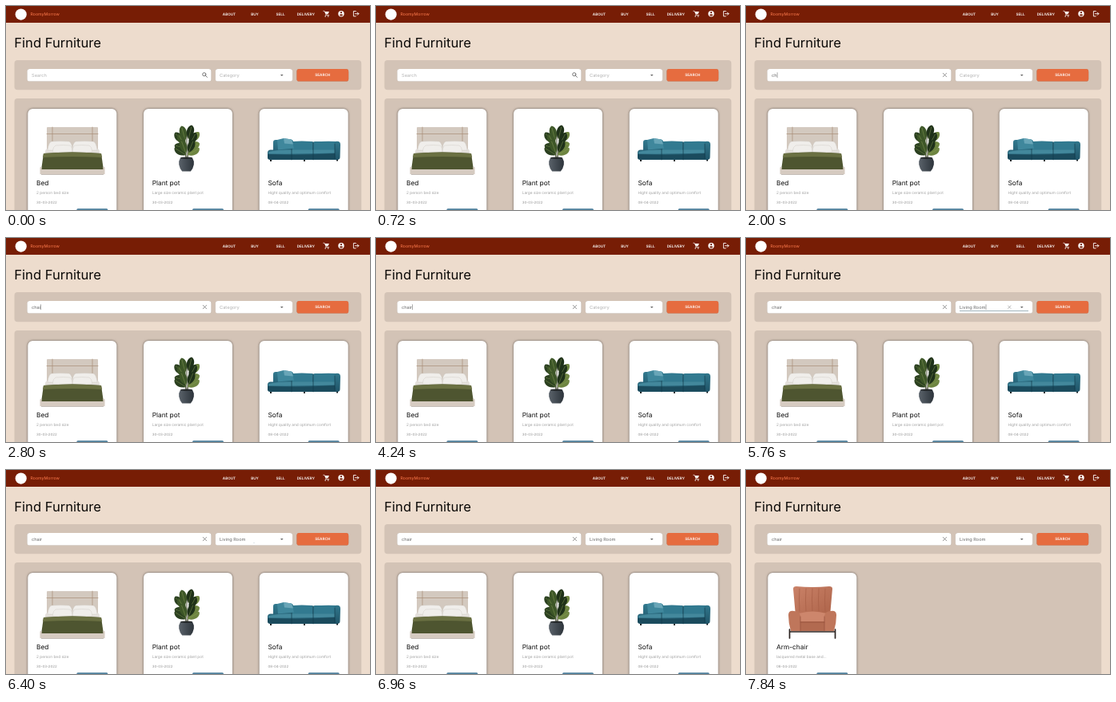
Animation, 455 px wide and 256 px high, one loop 8000 ms. Source, as an HTML page:

```html
<!DOCTYPE html>
<html lang="en">
<head>
<meta charset="utf-8">
<title>Find Furniture</title>
<style>
  html, body { margin: 0; width: 100%; height: 100%; overflow: hidden; background: #eddccd; }
  svg { display: block; width: 455px; height: 256px; font-family: Inter, sans-serif; text-rendering: geometricPrecision; }
  .nav { font-size: 4.6px; font-weight: 600; fill: #fff; }
  .input { font-size: 5.6px; fill: #686868; }
  .hint { font-size: 5.7px; fill: #b4b4b4; }
  .name { font-size: 8.3px; fill: #111; }
  .note { font-size: 4.8px; fill: #a0a0a0; }
  .date { font-size: 4.4px; fill: #909090; }
  .line { fill: none; stroke-linecap: round; stroke-linejoin: round; }
  .card { filter: drop-shadow(0 .8px 1.8px #0008); }
</style>
</head>
<body>
<svg viewBox="0 0 455 256">
  <defs>
    <linearGradient id="teal" x2="0" y2="1">
      <stop stop-color="#32798e"/><stop offset="1" stop-color="#1f5468"/>
    </linearGradient>
    <linearGradient id="clay" x2="1" y2="1">
      <stop stop-color="#ca8268"/><stop offset="1" stop-color="#ad6349"/>
    </linearGradient>
    <linearGradient id="pot" x2="1" y2="0">
      <stop stop-color="#5a626a"/><stop offset="1" stop-color="#2d343b"/>
    </linearGradient>
  </defs>
  <rect width="455" height="256" fill="#eddccd"/>

  <rect width="455" height="21" fill="#771d05"/>
  <circle cx="18.7" cy="10.6" r="7.1" fill="#fff"/>
  <text x="30.5" y="12.4" font-size="5.2" font-weight="500" fill="#ee7045">RoomyMorrow</text>
  <g class="nav" text-anchor="middle">
    <text x="279" y="12.4">ABOUT</text>
    <text x="311" y="12.4">BUY</text>
    <text x="343" y="12.4">SELL</text>
    <text x="374.9" y="12.4">DELIVERY</text>
  </g>
  <g fill="#fff">
    <path d="M396.8 6.3h1.3l2 4.1-.7 1.2h4.300" class="line" stroke="#fff" stroke-width=".7"/>
    <path d="M398.3 6.900h5.600l-1.500 3.300h-2.700z"/>
    <circle cx="399.2" cy="12.900" r=".75"/><circle cx="402.700" cy="12.900" r=".75"/>
    <circle cx="419" cy="9.7" r="3.7"/>
    <g fill="#771d05"><circle cx="419" cy="8.2" r="1.1"/><path d="M416.7 11.2q2.3-2 4.6 0q-2.3 2.5-4.6 0"/></g>
    <path d="M437.2 6.5h-2.8v6.4h2.8M436.5 9.7h4.3m-1.6-1.7 1.7 1.7-1.7 1.7" class="line" stroke="#fff" stroke-width=".9"/>
  </g>

  <text x="10.3" y="52.3" font-size="16.6" fill="#0b0907">Find Furniture</text>

  <g fill="#d3c3b6">
    <rect x="10.5" y="68" width="433.7" height="37.3" rx="4"/>
    <rect x="10.5" y="116" width="433.7" height="150" rx="4"/>
  </g>
  <g fill="#fff" style="filter:drop-shadow(0 .5px .7px #0004)">
    <rect x="26.5" y="79" width="230" height="15.6" rx="3.2"/>
    <rect x="261.8" y="79" width="96.3" height="15.6" rx="3.2"/>
    <rect x="363.4" y="79" width="64.8" height="15.6" rx="3.2" fill="#e66c3f"/>
  </g>
  <text class="nav" x="395.8" y="88.4" text-anchor="middle">SEARCH</text>

  <text id="query" class="input" x="32" y="88.6"></text>
  <text id="room" class="input" x="267" y="88.6"></text>
  <rect id="caret" y="83.3" width=".5" height="6.8" fill="#555"/>
  <path id="lens" class="line" d="M249.5 87.4l2 2M249.9 85.800a2.1 2.1 0 1 1-4.2 0a2.1 2.1 0 1 1 4.2 0" stroke="#666" stroke-width=".9"/>
  <path id="wipe" class="line" d="M246.3 84.4l4.4 4.4m0-4.4-4.4 4.4" stroke="#666" stroke-width=".7"/>
  <path id="clear" class="line" d="M327.6 85l3.4 3.4m0-3.400-3.400 3.400" stroke="#888" stroke-width=".6"/>
  <path d="M343 86h3.600l-1.800 1.900z" fill="#666"/>
  <rect id="rule" y="91" height=".6" fill="#5f7f8d"/>

  <g id="all"></g>
  <g id="found"></g>
</svg>
<script>
const $ = id => document.getElementById(id);

const bed = `
  <path d="M51 153q0-1 1-1h62q1 0 1 1v34H51z" fill="#d3c9bf"/>
  <path d="M51 160.500h64M58 152v22M108 152v22" class="line" stroke="#a98f78" stroke-width=".7"/>
  <path d="M49 183q0-4 4-4h60q4 0 4 4v5H49z" fill="#e5e1dd"/>
  <g fill="#f0eeeb" stroke="#cbc5be" stroke-width=".4">
    <path d="M52 181q1-10 5-11 11-1 22 0 4 2 4 12zM83 182q0-10 4-12 11-1 22 0 4 1 5 11z"/>
    <path d="M58 183q1-7 4-8 10-1 18 0 3 2 3 9zM83 184q0-7 3-9 8-1 18 0 3 1 4 8z"/>
  </g>
  <path d="M47 185q36-3 72 0l3 21H44z" fill="#4e5530"/>
  <path d="M47 185q36-3 72 0l1 5q-37-2-74 0z" fill="#6a7042"/>
  <path d="M42.500 203q0-1 1-1h1v3h77v-3h1q1 0 1 1v8h-81z" fill="#d6cbc1"/>
  <path d="M44 211.500h78" stroke="#9c9188" stroke-width=".6"/>`;

// base x, base y, tilt, length
const leaves = [
  [222, 172, -40, 17], [230, 171, 42, 17], [224, 169, -14, 19], [228, 167, 14, 18],
  [224, 179, -72, 14], [228, 178, 68, 15], [224, 176, -30, 17], [229, 175, 28, 18],
  [225, 187, -58, 17], [227, 187, 60, 17], [225, 185, -20, 18], [228, 184, 22, 17]
];
const greens = ['#2b4020', '#6d8440', '#3d5628', '#1f3119'];
const leaf = ([x, y, tilt, len], i) => `
  <g transform="translate(${x} ${y}) rotate(${tilt})">
    <path d="M0 0C-7 ${-len * .4} -5 ${-len * .9} 0 ${-len}C5 ${-len * .9} 7 ${-len * .4} 0 0" fill="${greens[i % 4]}"/>
    <path d="M0 0V${-len * .9}" stroke="#8fa45c" stroke-width=".4"/>
  </g>`;
const plant = `
  <path d="M226 191V162M227 191l2-18M225 191l-2-16" class="line" stroke="#3c4025" stroke-width=".9"/>
  ${leaves.map(leaf).join('')}
  <path d="M218 190.500h15q2.500 4 1.800 8.500-1 5.500-4 8.500h-10.600q-3-3-4-8.500-.700-4.500 1.800-8.500z" fill="url(#pot)"/>
  <ellipse cx="225.500" cy="190.700" rx="7.500" ry="1.300" fill="#24282a"/>`;

const sofa = `
  <path d="M330 192h2v3h-2zM413 191h2v3.500h-2zM372 192h2v3h-2z" fill="#1a2327"/>
  <path d="M334 171q0-3 3-3h20q2 0 2 2 10-1 23 0 2 0 2 1 15-2 28-1 6-1 6 4l-.5 16q0 3-4 3h-83q-3.500 0-3.500-3v-6q0-3 3-3.500h4z" fill="url(#teal)"/>
  <path d="M358 172q0-2 2-2h21q2 0 2 2v9h-25zM384 172q0-2 2-2h23q2 0 2 2v9h-27z" fill="#327a90"/>
  <path d="M339 168l8-2 10 1.500 3 11-20 2z" fill="#3f879c"/>
  <path d="M347 166l10 1.500 2 6-11-1z" fill="#69a6b8"/>
  <path d="M328 183q11-3 27-2.500h56v4q-40 1.500-83 1z" fill="#43889c"/>
  <path d="M327 186q45 2 84-1l1 7.500h-82q-3 0-3-3z" fill="#1b4b5d"/>
  <path d="M357 180v13M384 171v22M411 173v18" class="line" stroke="#143c4b" stroke-width=".7"/>`;

const ribs = [67, 75, 83, 91, 99].map(x => `M${x} 149q-1 14 0 28`).join('');
const armchair = `
  <path d="M54.500 200v11M111.500 200v11M55 203h56" class="line" stroke="#2b2320" stroke-width="1.700"/>
  <path d="M59 149q0-3 4-3 20 2 41 0 4 0 4 3l-3 34H62z" fill="url(#clay)"/>
  <path d="${ribs}" class="line" stroke="#a65e46" stroke-width=".7"/>
  <path d="M66 180q17-5 35 0v11H66z" fill="#cd866c"/>
  <path d="M66 190h35v12H66z" fill="#b26a50"/>
  <path d="M53 182q0-6 7-5 8 0 8 8v17H56q-3-10-3-20zM113 182q0-6-7-5-8 0-8 8v17h12q3-10 3-20z" fill="#bf765b"/>
  <path d="M68 184v18M98 184v18M68 191h30" class="line" stroke="#94503a" stroke-width=".7"/>`;

const card = (x, art, name, note, date) => `
  <rect class="card" x="${x}" y="129" width="111" height="145" rx="6" fill="#fff"/>
  ${art}
  <text class="name" x="${x + 10.7}" y="225.4">${name}</text>
  <text class="note" x="${x + 10.7}" y="236">${note}</text>
  <text class="date" x="${x + 10.7}" y="247.8">${date}</text>
  <rect x="${x + 61}" y="254.3" width="39" height="10" rx="1.5" fill="#4d7f9c"/>`;

$('all').innerHTML =
  card(27.3, bed, 'Bed', '2 person bed size', '30-03-2022') +
  card(172, plant, 'Plant pot', 'Large size ceramic plant pot', '30-03-2022') +
  card(316.7, sofa, 'Sofa', 'Hight quality and optimum comfort', '08-04-2022');
$('found').innerHTML =
  card(27.3, armchair, 'Arm-chair', 'lacquered metal base and...', '08-04-2022');

const LOOP = 8000;
const keys = [1680, 2000, 2400, 2800, 4240];
const carets = [[1360, 3520], [3840, 5360], [5760, 6240]];
const focus = 4640, pick = 5200, blur = 6240, result = 7680;

const within = (t, a, b) => t >= a && t < b;
const ramp = (t, from) => {
  const p = Math.min(1, Math.max(0, (t - from) / 200));
  return 1 - (1 - p) ** 3;
};
const show = (id, on) => $(id).setAttribute('visibility', on ? 'visible' : 'hidden');
const fill = (id, value, hint) => {
  $(id).textContent = value || hint;
  $(id).setAttribute('class', value ? 'input' : 'hint');
  return value ? $(id).getComputedTextLength() : 0;
};

function draw(t) {
  const typed = 'chair'.slice(0, keys.filter(k => t >= k).length);
  const queryEnd = 32 + fill('query', typed, 'Search');
  const roomEnd = 267 + fill('room', t >= pick ? 'Living Room' : '', 'Category');
  $('caret').setAttribute('x', (t < focus ? queryEnd : roomEnd) + .3);
  show('caret', carets.some(([a, b]) => within(t, a, b)));
  show('lens', !typed);
  show('wipe', typed);
  show('clear', within(t, pick, blur));

  const width = 86 * (ramp(t, focus) - ramp(t, blur));
  $('rule').setAttribute('x', 310 - width / 2);
  $('rule').setAttribute('width', width);

  show('all', t < result);
  show('found', t >= result);
}

const start = performance.now();
function tick() {
  draw((performance.now() - start) % LOOP);
  requestAnimationFrame(tick);
}
tick();
</script>
</body>
</html>
```
